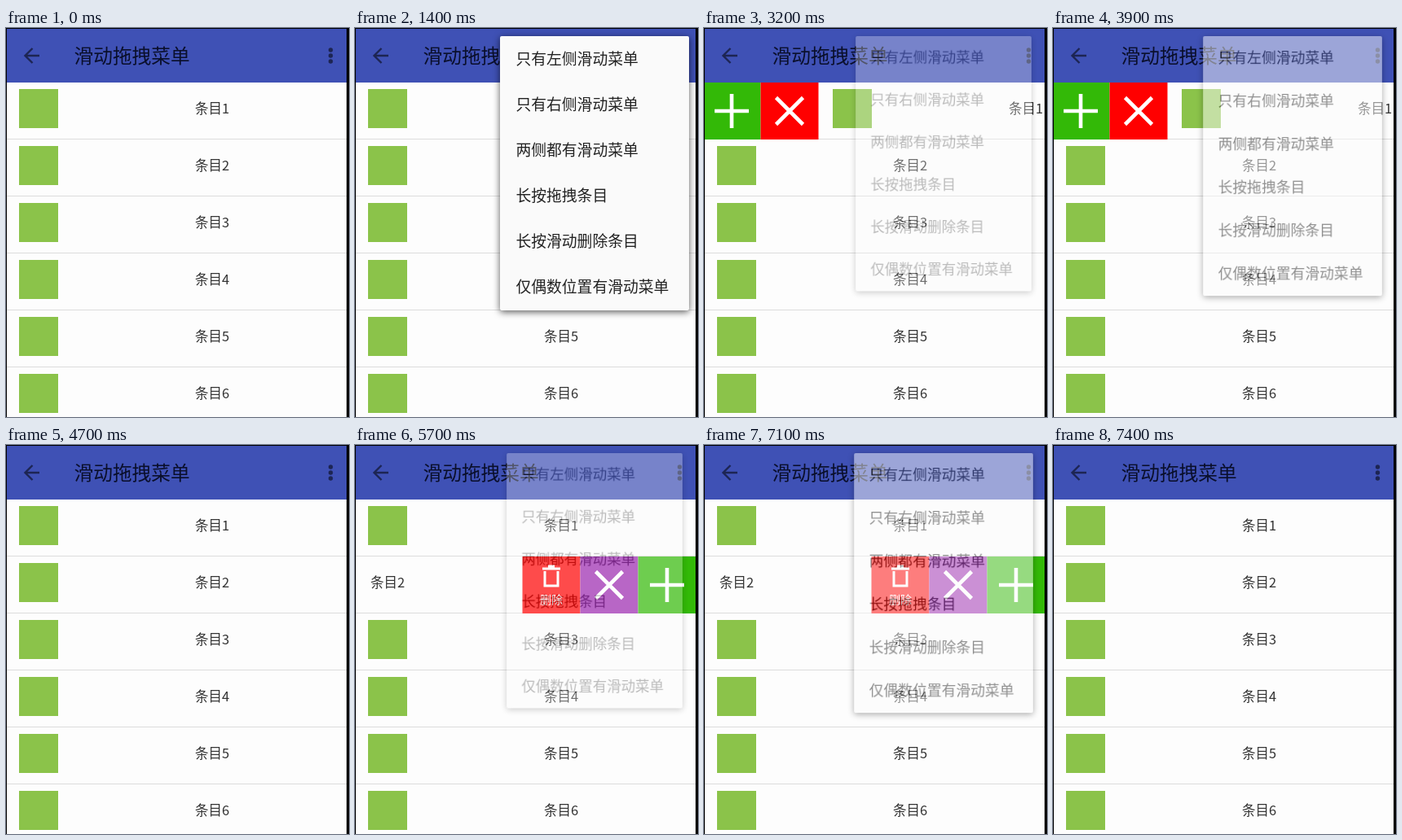
An HTML page for the animation above (8 s loop, 421 px wide and 478 px high).

```html
<!DOCTYPE html>
<html lang="zh-CN">
<head>
<meta charset="utf-8">
<title>滑动拖拽菜单</title>
<style>
  html, body { margin: 0; width: 100%; height: 100%; overflow: hidden; background: #000; }
  svg { display: block; width: 421px; height: 478px; font-family: "Noto Sans CJK SC", "Noto Sans CJK", sans-serif; }
  .title { font-size: 23.7px; fill: #0a0f2b; }
  .label { font-size: 16.5px; fill: #333; }
  .option { font-size: 18.8px; fill: #222; }
  .bar { fill: none; stroke: #1d2553; stroke-width: 2.4; }
  .glyph { fill: none; stroke: #fff; stroke-width: 4.6; }
  .thin { stroke-width: 3; }
  .caption { font-size: 14px; fill: #fff; text-anchor: middle; }

  #row1, #row2, #menu { animation: 8s step-end infinite; }
  #row1 { animation-name: swipe-right; }
  #row2 { animation-name: swipe-left; }
  #menu {
    animation-name: popup;
    transform-origin: 294px 10px;
    filter: drop-shadow(0 2px 4px rgba(0, 0, 0, .65));
  }

  /* 100 ms is 1.25 % of the loop */
  @keyframes swipe-right {
    0% { transform: translateX(0); }
    31.25% { transform: translateX(52px); }
    32.5% { transform: translateX(109px); }
    33.75% { transform: translateX(134px); }
    35% { transform: translateX(142px); }
    50%, 100% { transform: translateX(0); }
  }
  @keyframes swipe-left {
    0% { transform: translateX(0); }
    62.5% { transform: translateX(-70px); }
    63.75% { transform: translateX(-155px); }
    65% { transform: translateX(-200px); }
    66.25% { transform: translateX(-213px); }
    90%, 100% { transform: translateX(0); }
  }
  @keyframes popup {
    0%, 26.25%, 50%, 90%, 100% { opacity: 0; transform: scale(.9); }
    13.75%, 40%, 71.25% { opacity: .3; transform: scale(.93); }
    15%, 72.5% { opacity: .65; transform: scale(.965); }
    41.25% { opacity: .75; transform: scale(.975); }
    16.25%, 73.75% { opacity: .9; transform: scale(.99); }
    17.5%, 42.5%, 75% { opacity: 1; transform: scale(1); }
    25%, 48.75%, 88.75% { opacity: .5; transform: scale(.947); }
  }
</style>
</head>
<body>
<svg viewBox="0 0 421 478">
  <defs>
    <path id="plus" class="glyph" d="M-21 0H21M0 -21V21"/>
    <path id="cross" class="glyph" d="M-16.5 -16.5L16.5 16.5M16.5 -16.5L-16.5 16.5"/>
    <g id="bin">
      <path class="glyph thin" d="M-11 -20H11M-4 -23H4M-8 -17V1H8V-17"/>
      <text class="caption" y="23">删除</text>
    </g>
  </defs>

  <rect x="1" y="1" width="417" height="477" fill="#fdfdfd"/>
  <g id="list"></g>

  <rect x="1" y="1" width="417" height="66" fill="#3f51b5"/>
  <path class="bar" d="M41 34H24M32.5 25L23.5 34L32.5 43"/>
  <text class="title" x="83.5" y="43">滑动拖拽菜单</text>
  <g fill="#1d2553">
    <circle cx="398.5" cy="27" r="2.7"/>
    <circle cx="398.5" cy="34" r="2.7"/>
    <circle cx="398.5" cy="41" r="2.7"/>
  </g>

  <g id="menu">
    <rect x="178" y="10" width="232" height="337" rx="2" fill="#fafafa"/>
  </g>

  <path d="M0 0H421V478H418V1H1V478H0Z"/>
</svg>
<script>
  const GREEN = '#33b907', RED = '#f00', PURPLE = '#9c27b0';
  const PITCH = 70, BUTTON = 71;

  const button = (x, color, icon) => `
    <rect x="${x}" y="67" width="${BUTTON}" height="${PITCH}" fill="${color}"/>
    <use href="#${icon}" x="${x + BUTTON / 2}" y="102"/>`;

  const actions = [
    button(-1.5 - 2 * BUTTON, GREEN, 'plus') + button(-1.5 - BUTTON, RED, 'cross'),
    button(418.5, RED, 'bin') + button(418.5 + BUTTON, PURPLE, 'cross') +
      button(418.5 + 2 * BUTTON, GREEN, 'plus')
  ];

  const row = i => `
    <g transform="translate(0 ${i * PITCH})">
      <rect x="1" y="136" width="417" height="1" fill="#dcdcdc"/>
      <g id="row${i + 1}">
        <rect x="16" y="75" width="48" height="48" fill="#8bc34a"/>
        <text class="label" x="232" y="105.2">条目${i + 1}</text>
        ${actions[i] || ''}
      </g>
    </g>`;

  const options = ['只有左侧滑动菜单', '只有右侧滑动菜单', '两侧都有滑动菜单',
    '长按拖拽条目', '长按滑动删除条目', '仅偶数位置有滑动菜单'];

  document.getElementById('list').innerHTML =
    Array.from({ length: 6 }, (_, i) => row(i)).join('');
  document.getElementById('menu').insertAdjacentHTML('beforeend', options.map((text, i) =>
    `<text class="option" x="197.5" y="${45 + i * 56}">${text}</text>`).join(''));
</script>
</body>
</html>
```
